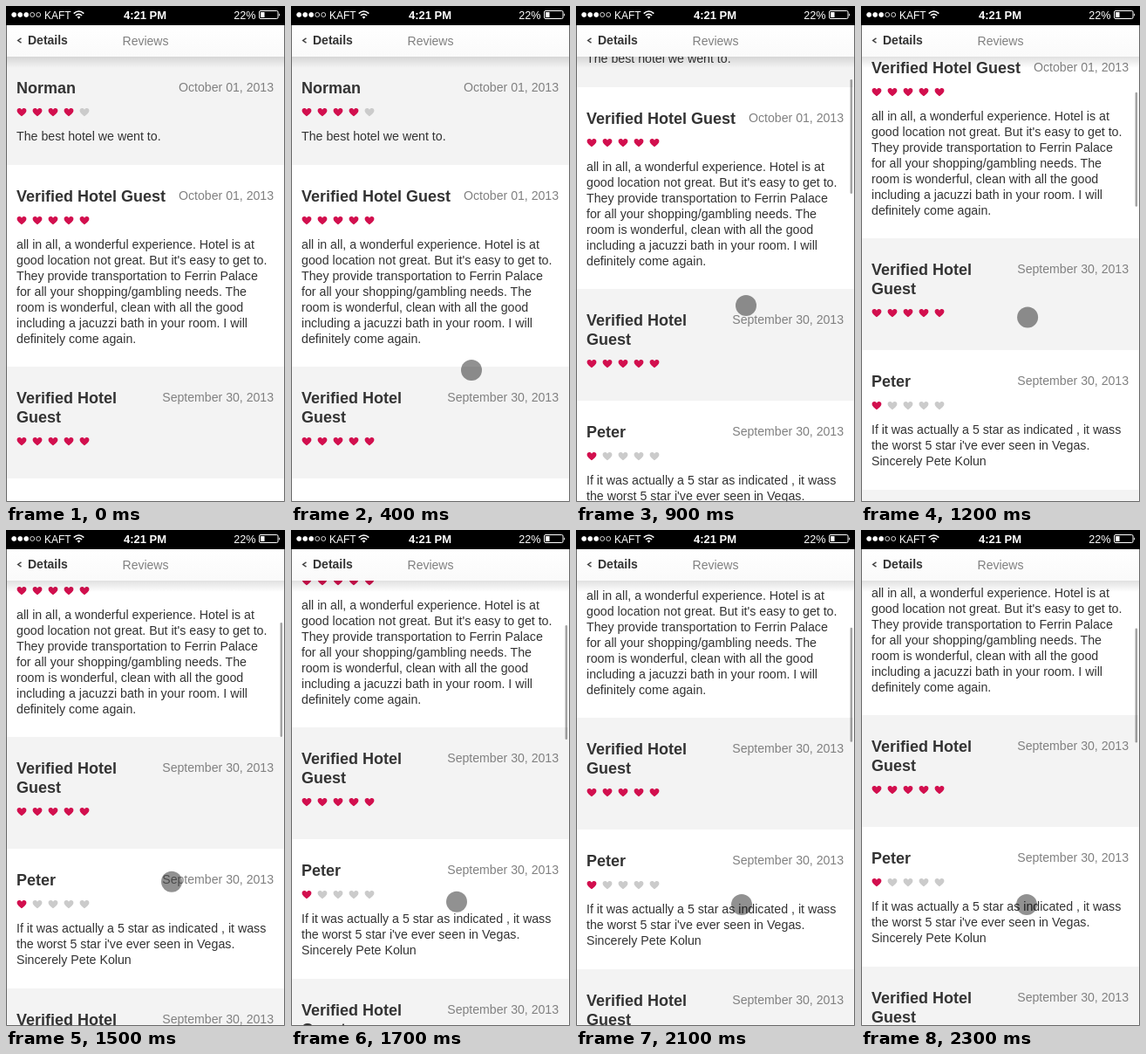
Write an HTML page that moves like this. It is 320 by 568 pixels and loops after 3.3 s.

```html
<!DOCTYPE html>
<html lang="en">
<head>
<meta charset="utf-8">
<title>Hotel reviews</title>
<style>
  html, body { margin: 0; width: 100%; height: 100%; overflow: hidden; background: #fff; }
  svg { display: block; width: 100%; height: 100%; }
  text { font: 14.2px "Liberation Sans", Arial, sans-serif; fill: #333; white-space: pre; }
  .name { font-size: 18px; font-weight: bold; }
  .date { font-size: 14.1px; fill: #808080; text-anchor: end; }
  .bar { font-size: 14px; }
  .status text { fill: #fff; }
</style>
</head>
<body>
<svg viewBox="0 0 320 568">
  <defs>
    <path id="heart" d="M0 4.8C-2 3-5.4.9-5.4-1.8C-5.4-3.5-4.2-4.5-2.8-4.5C-1.5-4.5-.5-3.8 0-2.8C.5-3.8 1.5-4.5 2.8-4.5C4.2-4.5 5.4-3.5 5.4-1.8C5.4.9 2 3 0 4.8Z"/>
    <linearGradient id="shade" x2="0" y2="1">
      <stop offset="0" stop-color="#000" stop-opacity=".12"/>
      <stop offset="1" stop-color="#000" stop-opacity="0"/>
    </linearGradient>
    <linearGradient id="head" x2="0" y2="1">
      <stop offset="0" stop-color="#fff"/>
      <stop offset="1" stop-color="#fafafa"/>
    </linearGradient>
  </defs>
  <rect width="320" height="568" fill="#fff"/>
  <g id="list"></g>

  <rect y="58" width="320" height="13" fill="url(#shade)"/>
  <rect y="22" width="320" height="36" fill="url(#head)"/>
  <path d="M17.5 36.8L13.7 39.5L17.5 42.2" fill="none" stroke="#444" stroke-width="1.5"/>
  <text class="bar" x="25" y="44" style="font-weight:bold">Details</text>
  <text class="bar" x="160" y="45" text-anchor="middle" style="fill:#808080">Reviews</text>

  <rect id="thumb" x="314.5" width="2.5" height="131" rx="1.25" fill="#000" opacity=".36"/>
  <circle id="touch" r="12" fill="#000" opacity=".43"/>
  <path d="M.5 22V567.5H319.5V22" fill="none" stroke="#666"/>

  <g class="status">
    <rect width="320" height="22"/>
    <g id="signal"></g>
    <text x="44" y="14.5" style="font-size:12px">KAFT</text>
    <g fill="none" stroke="#fff" stroke-width="1.6">
      <path d="M77.7 8.6Q83.5 3.4 89.3 8.6"/>
      <path d="M79.9 11Q83.5 7.8 87.1 11"/>
    </g>
    <path d="M81.6 12.6Q83.5 11 85.4 12.6L83.5 14.8Z" fill="#fff"/>
    <text x="159.5" y="14.5" text-anchor="middle" style="font-size:13px;font-weight:bold">4:21 PM</text>
    <text x="286.5" y="14.5" text-anchor="end" style="font-size:12.6px">22%</text>
    <rect x="290.5" y="5.5" width="21.5" height="9" rx="1.5" fill="none" stroke="#fff"/>
    <rect x="292" y="7" width="4.5" height="6" fill="#fff"/>
    <path d="M313 8.2Q315 10 313 11.8Z" fill="#fff"/>
  </g>
</svg>
<script>
const NS = "http://www.w3.org/2000/svg";
const $ = id => document.getElementById(id);
const list = $("list"), thumb = $("thumb"), touch = $("touch");

function add(parent, tag, attrs, text) {
  const el = document.createElementNS(NS, tag);
  for (const k in attrs) el.setAttribute(k, attrs[k]);
  if (text) el.textContent = text;
  parent.appendChild(el);
  return el;
}

const guest = ["Verified Hotel", "Guest"];
const reviews = [
  { top: 58, h: 124, name: ["Norman"], date: "October 01, 2013", score: 4,
    body: ["The best hotel we went to."] },
  { top: 182, h: 231, name: ["Verified Hotel Guest"], date: "October 01, 2013", score: 5,
    body: ["all in all, a wonderful experience. Hotel is at",
      "good location not great. But it's easy to get to.",
      "They provide transportation to Ferrin Palace",
      "for all your shopping/gambling needs. The",
      "room is wonderful, clean with all the good",
      "including a jacuzzi bath in your room. I will",
      "definitely come again."] },
  { top: 413, h: 128, name: guest, date: "September 30, 2013", score: 5, body: [] },
  { top: 541, h: 160, name: ["Peter"], date: "September 30, 2013", score: 1,
    body: ["If it was actually a 5 star as indicated , it wass",
      "the worst 5 star i've ever seen in Vegas.",
      "Sincerely Pete Kolun"] },
  { top: 701, h: 128, name: guest, date: "September 30, 2013", score: 5, body: [] }
];

reviews.forEach((r, i) => {
  const g = add(list, "g", { transform: `translate(0 ${r.top})` });
  const extra = (r.name.length - 1) * 22;
  add(g, "rect", { width: 320, height: r.h, fill: i % 2 ? "#fff" : "#f3f3f3" });
  r.name.forEach((s, n) => add(g, "text", { class: "name", x: 12, y: 42 + n * 22 }, s));
  add(g, "text", { class: "date", x: 307, y: 40 }, r.date);
  for (let n = 0; n < 5; n++)
    add(g, "use", { href: "#heart", x: 18 + n * 18, y: 63.5 + extra,
      fill: n < r.score ? "#d20f4e" : "#cbcbcb" });
  r.body.forEach((s, n) => add(g, "text", { x: 12, y: 95.5 + n * 18 }, s));
});

for (let n = 0; n < 5; n++)
  add($("signal"), "circle", { cx: 9.2 + n * 7, cy: 10, r: 2.5,
    fill: n < 3 ? "#fff" : "none", stroke: "#fff", "stroke-width": .8 });

const clamp = u => Math.min(1, Math.max(0, u));
const mix = (a, b, u) => a + (b - a) * u;

// The drag starts late, then the list coasts to rest.
function scrollAt(t) {
  if (t < 700) return 0;
  if (t < 900) return mix(30, 89, (t - 700) / 200);
  return 206 - 117 * Math.exp((900 - t) / 440);
}

// The finger swipes up, rests, then eases back down.
function fingerAt(t) {
  if (t < 1000) {
    const u = clamp((t - 100) / 600);
    return [mix(219, 195, u), mix(491, 343, u)];
  }
  const u = clamp((t - 988) / 815);
  return [mix(195, 190, clamp(u * 3)), mix(343, 429, (1 - Math.cos(Math.PI * u)) / 2)];
}

function draw(ms) {
  const t = Math.min(2300, Math.floor(ms % 3300 / 100) * 100);
  const y = Math.round(scrollAt(t));
  const [fx, fy] = fingerAt(t);
  list.setAttribute("transform", `translate(0 ${-y})`);
  thumb.setAttribute("y", 61.4 + y * .254);
  thumb.setAttribute("visibility", y ? "visible" : "hidden");
  touch.setAttribute("cx", fx);
  touch.setAttribute("cy", fy);
  touch.setAttribute("visibility", t < 100 ? "hidden" : "visible");
}

const start = performance.now();
function tick() {
  draw(performance.now() - start);
  requestAnimationFrame(tick);
}
tick();
</script>
</body>
</html>
```
